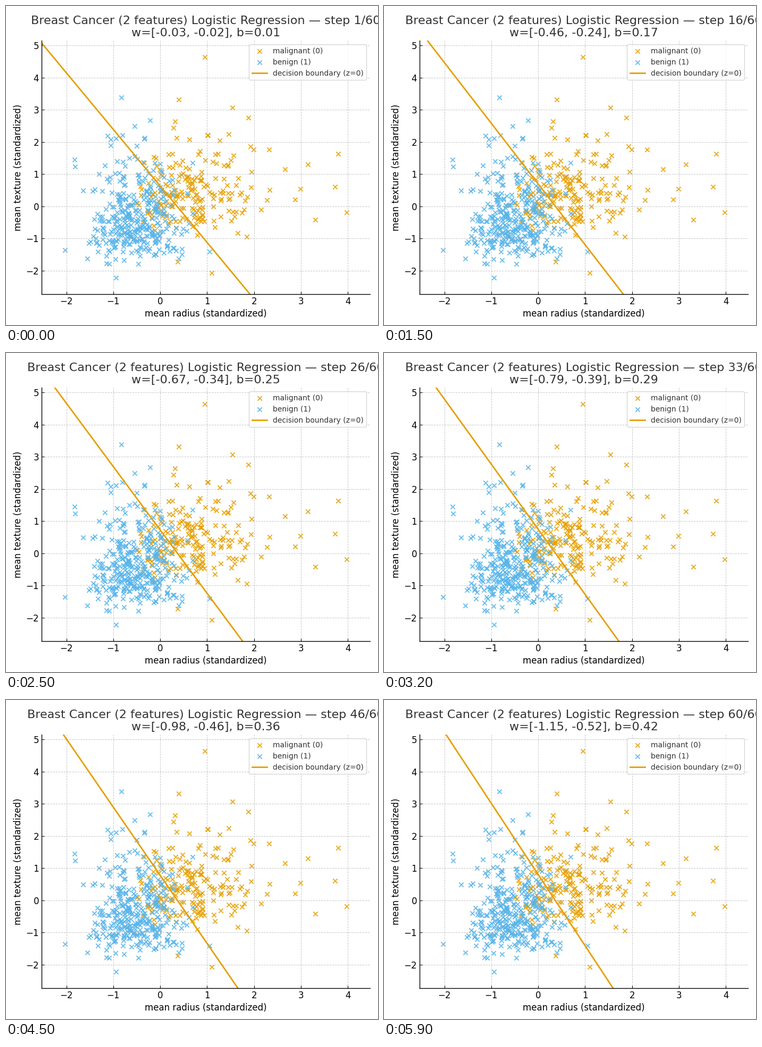
These frames come from a looping animation (700x600 px, 6000 ms). A matplotlib script:

```python
import numpy as np
import matplotlib.pyplot as plt
from matplotlib.animation import FuncAnimation

STEPS = 60
WIDTH, HEIGHT = 700, 600
ORANGE, BLUE = "#E69F00", "#56B4E9"
X_LIM = (-2.5296, 4.4713)
Y_LIM = (-2.7292, 5.1519)

plt.rcParams.update({
    "font.family": "DejaVu Sans",
    "font.size": 10,
    "axes.titlesize": 16,
    "axes.labelsize": 12,
    "xtick.labelsize": 12,
    "ytick.labelsize": 12,
    "xtick.direction": "in",
    "ytick.direction": "in",
    "axes.spines.top": False,
    "axes.spines.right": False,
    "axes.linewidth": 1.0,
})

rng = np.random.default_rng(7)


def skewed(n, low, mean, sd):
    """Gamma samples that start at low, with the given mean and deviation."""
    rise = mean - low
    return low + rng.gamma((rise / sd) ** 2, sd ** 2 / rise, n)


def inside(x, y, x_range, y_range, n):
    """First n points that lie in the given box."""
    keep = ((x > x_range[0]) & (x < x_range[1])
            & (y > y_range[0]) & (y < y_range[1]))
    return np.column_stack([x, y])[keep][:n]


# The outermost points of each class stand alone; the rest is sampled.
malignant_far = [(.95, 4.65), (.40, 3.32), (1.54, 3.07), (1.88, 2.76),
                 (.31, 2.64), (.28, 2.44), (3.79, 1.64), (3.15, 1.31),
                 (2.66, 1.15), (3.72, .61), (2.99, .54), (2.87, .21),
                 (3.97, -.18), (3.30, -.41), (1.10, -2.07), (.37, -1.72)]
benign_far = [(-.83, 3.39), (-.22, 2.67), (-.54, 2.50), (-1.82, 1.45),
              (-1.81, 1.23), (-2.03, -1.36), (-.94, -2.22), (1.05, -1.40)]

malignant = np.vstack([malignant_far, inside(
    skewed(900, -1.2, .95, .85), skewed(900, -2.2, .5, .75),
    (-.8, 2.35), (-1.1, 2.3), 196)])
benign = np.vstack([benign_far, inside(
    rng.normal(-.54, .48, 900), skewed(900, -2.2, -.36, .84),
    (-1.65, .7), (-1.95, 2.35), 349)])


def params(step):
    """Weights and bias: the boundary steepens as the weights grow."""
    w1 = -.0353 * step / (1 + step / 57) ** .85
    slope = 1.7495 + .00905 * step - 2.15e-5 * step ** 2
    height = .631 + .0044 * step - 2.55e-5 * step ** 2
    w2 = w1 / slope
    return w1, w2, -w2 * height


fig, ax = plt.subplots(figsize=(WIDTH / 100, HEIGHT / 100), dpi=100)
fig.subplots_adjust(left=66.8 / WIDTH, right=685 / WIDTH,
                    bottom=58 / HEIGHT, top=534.8 / HEIGHT)
ax.set(xlim=X_LIM, ylim=Y_LIM,
       xlabel="mean radius (standardized)",
       ylabel="mean texture (standardized)")
ax.grid(True, linestyle="--", linewidth=0.7, color="#b0b0b0", alpha=0.7)

for points, color, label in ((malignant, ORANGE, "malignant (0)"),
                             (benign, BLUE, "benign (1)")):
    ax.scatter(*points.T, s=36, marker="x", color=color,
               linewidths=1.4, alpha=0.85, label=label)
boundary, = ax.plot([], [], color=ORANGE, linewidth=2,
                    label="decision boundary (z=0)")
ax.legend(loc="upper right", fontsize=10, labelcolor="#333333")
title = ax.set_title("", color="#333333")
xs = np.array(X_LIM)


def draw(i):
    step = i + 1
    w1, w2, b = params(step)
    boundary.set_data(xs, -(w1 * xs + b) / w2)
    title.set_text(
        f"Breast Cancer (2 features) Logistic Regression — step {step}/{STEPS}\n"
        f"w=[{w1:.2f}, {w2:.2f}], b={b:.2f}")
    return boundary, title


anim = FuncAnimation(fig, draw, frames=STEPS, interval=100,
                     repeat=True, repeat_delay=0, blit=False)
plt.show()
```
